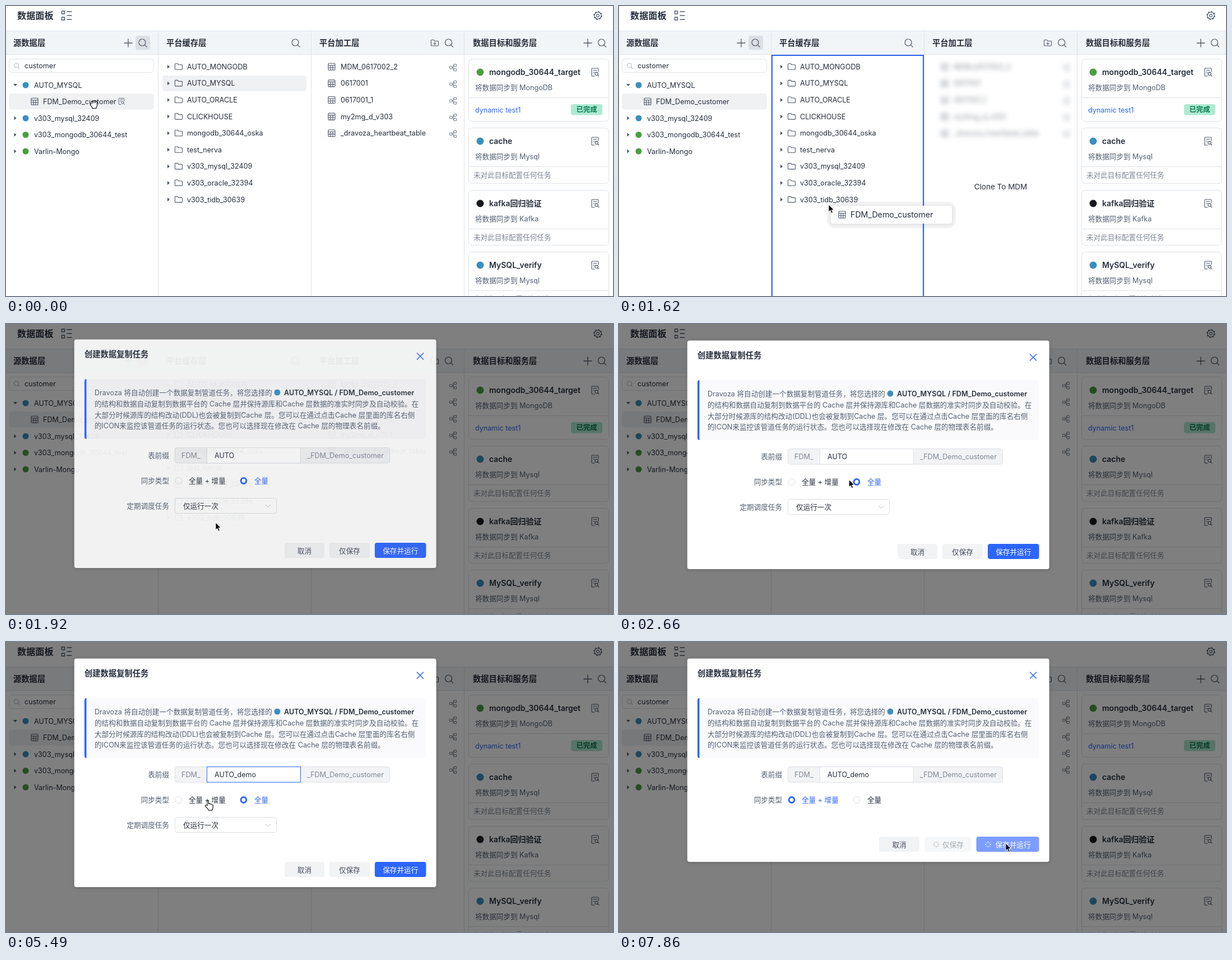
An HTML page that plays this animation: 1083 by 517 pixels, repeating every 8000 ms.

```html
<!DOCTYPE html>
<html lang="zh-CN">
<head>
<meta charset="utf-8">
<title>数据面板</title>
<style>
  html, body { margin: 0; width: 100%; height: 100%; overflow: hidden; background: #fff; }
  svg { display: block; width: 1083px; height: 517px; font: 12.6px Inter, "Noto Sans CJK SC", "Noto Sans CJK", sans-serif; fill: #272e3b; }
  .icon { fill: none; stroke: #4e5969; stroke-width: 1.1; stroke-linecap: round; stroke-linejoin: round; }
  .line { fill: none; stroke: #dfe2e8; }
  .bold { font-weight: 600; }
  .mid { text-anchor: middle; }
  .end { text-anchor: end; }
  .sub { fill: #535f72; }
  .note { fill: #7f8794; }
  .blue { fill: #2c65ff; }
  .faded { filter: blur(4px); opacity: .55; }
  .mysql { fill: #3b8fbe; }
  .mongo { fill: #4a9e40; }
  .kafka { fill: #16181c; }
</style>
</head>
<body>
<svg id="stage" viewBox="0 0 1083 517">
  <defs>
    <g id="plus" class="icon" style="stroke-width:1.3"><path d="M-7 0H7M0-7V7"/></g>
    <g id="lens" class="icon" style="stroke-width:1.2"><circle cx="-1" cy="-1" r="6"/><path d="M3.6 3.6 7 7"/></g>
    <g id="folder" class="icon"><path d="M-6.5 4V-4.5Q-6.5-5.5-5.5-5.5H-1.5L0-3.5H5.5Q6.5-3.5 6.5-2.5V4Q6.5 5 5.5 5H-5.5Q-6.5 5-6.5 4Z"/></g>
    <g id="folderPlus" class="icon"><use href="#folder"/><path d="M-2.4 1H2.4M0-1.4V3.4"/></g>
    <g id="table" class="icon"><rect x="-6" y="-6" width="12" height="12" rx="1"/><path d="M-6-2.5H6M-6 1.7H6M-2 -2.5V6M2-2.5V6"/></g>
    <g id="doc" class="icon"><path d="M6-1V-6Q6-7 5-7H-5Q-6-7-6-6V6Q-6 7-5 7H-1M-3-3.5H3M-3 0H-1"/><circle cx="2.6" cy="2.8" r="2.7"/><path d="M4.6 4.8 7 7"/></g>
    <g id="share" class="icon" style="stroke:#737d8c;stroke-width:1"><rect x="-6" y="-2" width="4" height="4"/><rect x="1.5" y="-6" width="4" height="4"/><rect x="1.5" y="2" width="4" height="4"/><path d="M-2 0H0M1.5-4H0V4H1.5"/></g>
    <g id="list" class="icon" style="stroke-width:1.4"><path d="M-8.5-8H-3.5V-3H-8.5ZM-8.5 3H-3.5V8H-8.5ZM1-7H9M1 0H9M1 7H9"/></g>
    <g id="gear" class="icon"><circle r="6"/><circle r="2.4"/><circle r="7" style="stroke-width:1.6;stroke-linecap:butt" stroke-dasharray="2.75"/></g>
    <path id="closed" d="M-2-3.5V3.5L2 0Z" fill="#4e5969"/>
    <path id="open" d="M-3.5-2H3.5L0 2Z" fill="#4e5969"/>
    <path id="arrow" d="M0 0V13L3 10.4 5.2 15.3 7.4 14.3 5.3 9.5H9.4Z" fill="#000" stroke="#fff" stroke-width=".9"/>
    <path id="beam" d="M-3-7Q0-7 0-5Q0-7 3-7M0-5V6M-3 8Q0 8 0 6Q0 8 3 8M-1.5 1H1.5" fill="none" stroke="#000" stroke-width="1.2" stroke-linecap="round"/>
    <path id="hand" d="M-2 8V1Q-2-.6-.7-.6 .6-.6 .6 1V5.5Q2.5 4.6 3.4 6 5.2 5.3 6 6.8 8.4 6.3 8.4 9V11.5Q8.4 14 7 15.5V17H0V15.5L-5.2 9.8Q-6 8.2-4.6 7.6-3.6 7.2-2 9Z" fill="#fff" stroke="#000" stroke-width="1.1" stroke-linejoin="round"/>
    <path id="grab" d="M-5-2.5Q-4.5-4.8-2.6-4 -2-5.8 0-4.7 1.4-6 2.8-4.3 5.6-5 5.6-2V2.5Q5.6 5 4 6.5V8.5H-3V7L-6.4 2.4Q-7.3.6-5 .4ZM-2.5-3.8V-.6M.1-4.5V-.8M2.8-4.2V-.7" fill="#fff" stroke="#000" stroke-width="1.1" stroke-linejoin="round"/>
  </defs>
</svg>
<script>
const stage = document.getElementById('stage');
const $ = id => document.getElementById(id);

const text = (x, y, s, cls = '', size = 12.6) =>
  `<text x="${x}" y="${y + size * .36}" class="${cls}" font-size="${size}">${s}</text>`;
const icon = (id, x, y) => `<use href="#${id}" x="${x}" y="${y}"/>`;
const box = (x, y, w, h, attrs, r = 4) =>
  `<rect x="${x}" y="${y}" width="${w}" height="${h}" rx="${r}" ${attrs}/>`;
const dot = (x, y, kind, r = 5.5) => `<circle cx="${x}" cy="${y}" r="${r}" class="${kind}"/>`;
const path = (d, attrs) => `<path d="${d}" ${attrs}/>`;
const group = (id, body) => `<g id="${id}">${body}</g>`;
const rowY = i => 108.3 + i * 29.6;

function header() {
  const titles = [[13, '源数据层'], [286, '平台缓存层'], [559, '平台加工层'], [833, '数据目标和服务层']];
  return text(20, 17.3, '数据面板', 'bold', 16.2) + icon('list', 108, 17) + icon('gear', 1056, 17) +
    box(0, 44, 1083, 42, 'fill="#f2f5f8"', 0) +
    path('M0 44.5H1083M0 86.5H1083M271.5 45V517M544.5 45V517M817.5 45V517', 'class="line"') +
    titles.map(([x, s]) => text(x, 66, s, 'bold', 14.3)).join('') +
    box(231, 53, 26, 25, 'fill="#dcdfe3"') +
    icon('plus', 218, 66) + icon('plus', 1038, 66) + icon('folderPlus', 765, 66) +
    [244, 517, 790.5, 1063.5].map(x => icon('lens', x, 66)).join('');
}

function sources() {
  const rows = [['AUTO_MYSQL', 'mysql', 141, 'open'], ['v303_mysql_32409', 'mysql', 200, 'closed'],
    ['v303_mongodb_30644_test', 'mongo', 229.5, 'closed'], ['Varlin-Mongo', 'mongo', 259, 'closed']];
  return box(5.5, 94.5, 258, 24, 'class="line"', 5) +
    '<g class="icon" style="stroke:#b6bcc6"><circle cx="18.5" cy="106" r="4"/><path d="M21.6 109 24 111.5"/></g>' +
    text(33, 106.5, 'customer') +
    box(5, 156, 259, 28.5, 'fill="#f0f1f3"', 5) +
    rows.map(([s, kind, y, caret]) => icon(caret, 16.5, y) + dot(35, y, kind) + text(50, y, s)).join('') +
    icon('table', 51, 170.3) + text(66, 170.3, 'FDM_Demo_customer') +
    group('rowDoc', '<use href="#doc" transform="translate(206 170) scale(.8)"/>');
}

function cache() {
  const names = ['AUTO_MONGODB', 'AUTO_MYSQL', 'AUTO_ORACLE', 'CLICKHOUSE', 'mongodb_30644_oska',
    'test_nerva', 'v303_mysql_32409', 'v303_oracle_32394', 'v303_tidb_30639'];
  return group('rowHover', box(279, 124, 257, 28, 'fill="#f0f1f3"')) +
    names.map((s, i) => icon('closed', 290, rowY(i)) + icon('folder', 308, rowY(i)) + text(323, rowY(i), s)).join('') +
    group('drop', box(273, 88, 270, 440, 'fill="none" stroke="#2c65ee" stroke-width="2"', 0));
}

function models() {
  const names = ['MDM_0617002_2', '0617001', '0617001_1', 'my2mg_d_v303', '_dravoza_heartbeat_table'];
  return group('models', names.map((s, i) =>
      icon('table', 581, rowY(i)) + text(597, rowY(i), s) + icon('share', 798, rowY(i) + 1.5)).join('')) +
    group('clone', text(681, 322.5, 'Clone To MDM', 'mid', 13.5));
}

function targets() {
  const cards = [[94.5, 111, 'mongodb_30644_target', 'mongo', 'MongoDB'], [217.5, 99, 'cache', 'mysql', 'Mysql'],
    [328.5, 98, 'kafka回归验证', 'kafka', 'Kafka'], [438.5, 98, 'MySQL_verify', 'mysql', 'Mysql']];
  return cards.map(([y, h, name, kind, db], i) =>
    box(825.5, y, 250, h, 'class="line"', 6) + path(`M826 ${y + 69}H1075`, 'class="line"') +
    dot(846, y + 23.5, kind, 6.5) + text(862, y + 23.7, name, 'bold', 14) + icon('doc', 1051, y + 23.5) +
    text(837, y + 50.7, '将数据同步到 ' + db, 'sub') +
    (i ? text(834, y + 84, '未对此目标配置任何任务', 'note') : '')).join('') +
    text(837, 185, 'dynamic test1', 'blue') +
    box(1008, 175, 56, 19.5, 'fill="#aeead2"') +
    '<g style="fill:#087a52">' + text(1036, 184.7, '已完成', 'mid bold', 12.4) + '</g>';
}

const ghost = () => group('ghost',
  box(-7, -7, 230, 47, 'fill="#000" opacity=".05"', 14) + box(-3, -2, 222, 38, 'fill="#000" opacity=".04"', 8) +
  box(0, 0, 216, 32, 'fill="#fff"') + icon('table', 20, 16) + text(35, 16, 'FDM_Demo_customer', '', 14.2));

function spinner(x, y, color) {
  const spokes = Array.from({ length: 8 }, (_, i) => {
    const a = i * Math.PI / 4, c = Math.cos(a), s = Math.sin(a);
    return `M${x + 2.8 * c} ${y + 2.8 * s}L${x + 5.6 * c} ${y + 5.6 * s}`;
  }).join('');
  return path(spokes, `stroke="${color}" fill="none"`);
}

const button = (x, w, s, fill, color, load) => box(x, 392, w, 27, `fill="${fill}"`) +
  `<g style="fill:${color}">` + text(x + w / 2 + (load ? 9.5 : 0), 406, s, 'mid') + '</g>' +
  (load ? spinner(x + 21, 405.8, color) : '');

function radio(id, x, label, labelX) {
  return group(id + 'On', `<circle cx="${x}" cy="281.5" r="4.9" fill="#fff" stroke="#2c65ff" stroke-width="3"/>` +
      text(labelX, 281.5, label, 'blue')) +
    group(id + 'Off', `<circle cx="${x}" cy="281.5" r="6" fill="#fff" stroke="#dcdfe6"/>` + text(labelX, 281.5, label));
}

function dialog() {
  const info = ['Dravoza 将自动创建一个数据复制管道任务，将您选择的',
    '的结构和数据自动复制到数据平台的 Cache 层并保持源库和Cache 层数据的准实时同步及自动校验。在',
    '大部分时候源库的结构改动(DDL)也会被复制到Cache 层。您可以在通过点击Cache 层里面的库名右侧',
    '的ICON来监控该管道任务的运行状态。您也可以选择现在修改在 Cache 层的物理表名前缀。'];
  const pale = '#f2f3f5', ink = '#434b59', off = '#a3aab5', blue = '#2c65ff', soft = '#7c9dff';
  return group('dialog',
    '<rect id="panel" x="121.8" y="29.4" width="645.8" rx="4" fill="#fff" style="filter:drop-shadow(0 1px 3px #0003)"/>' +
    text(140, 56, '创建数据复制任务', 'bold', 14.3) +
    path('M733 53.5 745 65.5M745 53.5 733 65.5', 'stroke="#2c65ff" stroke-width="1.5"') +
    box(140, 100, 609, 107, 'fill="#fafafc"') + path('M143.5 100Q140 100 140 104V203Q140 207 143.5 207Z', 'class="blue"') +
    info.map((s, i) => text(158, 124.8 + i * 19.7, s, 'sub')).join('') +
    dot(484, 124, 'mysql') + text(496, 124.2, 'AUTO_MYSQL / FDM_Demo_customer', 'bold') +
    text(291, 236.3, '表前缀', 'end sub') + text(291, 281.5, '同步类型', 'end sub') +
    box(301.5, 222.5, 383, 27.5, 'fill="#f2f3f5" stroke="#dcdfe6"') +
    text(313, 236.3, 'FDM_', 'note') + text(537, 236.3, '_FDM_Demo_customer', 'note') +
    '<rect id="field" x="358.5" y="222.5" width="167" height="27.5" fill="#fff"/>' +
    group('short', text(372, 236.3, 'AUTO')) + group('long', text(372, 236.3, 'AUTO_demo')) +
    path('M0 229V244', 'id="caret" stroke="#222"') +
    radio('full', 308, '全量 + 增量', 326) + radio('once', 424, '全量', 443) +
    group('schedule', text(291, 326, '定期调度任务', 'end sub') +
      box(301.5, 312.5, 181, 27, 'fill="#fff" stroke="#dcdfe6"') + text(316, 326, '仅运行一次') +
      path('M463 324 467.5 328.5 472 324', 'fill="none" stroke="#b6bcc6"')) +
    group('foot',
      group('idle', button(497, 71, '取消', pale, ink) + button(577, 72, '仅保存', pale, ink) + button(658, 91.5, '保存并运行', blue, '#fff')) +
      group('opening', button(476, 72, '取消', pale, ink) + button(557, 72, '仅保存', pale, ink) + button(638, 111.5, '保存并运行', soft, '#fff', true)) +
      group('saving', button(464, 72, '取消', pale, ink) + button(545, 83, '仅保存', '#f6f7f8', off, true) + button(637.5, 112, '保存并运行', soft, '#fff', true))));
}

stage.insertAdjacentHTML('beforeend', header() + sources() + cache() + models() + targets() + ghost() +
  box(0, 0, 1083, 517, 'id="mask" fill="#000"', 0) + dialog() + '<use id="cursor"/>');

// Pointer stops: tick, x, y
const stops = [[0, 157, 174], [3, 160, 172], [10, 374, 354], [15, 374, 354], [20, 430, 236], [28, 430, 236],
  [32, 492, 314], [36, 358, 283], [37, 361, 283], [44, 361, 283], [52, 690, 359], [54, 690, 359]];

function pointer(k) {
  const i = Math.max(1, stops.findIndex(s => s[0] >= k));
  const [k0, x0, y0] = stops[i - 1], [k1, x1, y1] = stops[i];
  const u = (k - k0) / (k1 - k0), e = u * u * (3 - 2 * u);
  return [x0 + (x1 - x0) * e, y0 + (y1 - y0) * e];
}

const show = (id, on) => $(id).style.display = on ? '' : 'none';

// Mask opacity, dialog opacity and dialog lift while the dialog opens
function opening(k) {
  if (k < 12) return [0, 0, 0];
  if (k === 12) return [.11, .09, -16];
  if (k === 13) return [.5, .9, -2];
  return [.5, 1, 0];
}

function draw(k) {
  const drag = k >= 4 && k < 12;
  const [x, y] = pointer(k);
  show('rowDoc', k < 4);
  show('rowHover', k < 4);
  show('ghost', drag);
  show('drop', drag && x > 272);
  show('clone', drag);
  $('models').setAttribute('class', drag ? 'faded' : '');
  $('ghost').setAttribute('transform', `translate(${x + 4} ${y + 2})`);

  const [dim, alpha, lift] = opening(k);
  const brief = k >= 39;
  show('dialog', alpha);
  $('mask').setAttribute('opacity', dim);
  $('dialog').setAttribute('opacity', alpha);
  $('dialog').setAttribute('transform', `translate(0 ${lift})`);
  $('panel').setAttribute('height', brief ? 362.5 : 407.5);
  $('foot').setAttribute('transform', `translate(0 ${brief ? -45 : 0})`);
  show('schedule', !brief);
  show('fullOn', brief);
  show('fullOff', !brief);
  show('onceOn', !brief);
  show('onceOff', brief);
  show('opening', k === 12);
  show('saving', k >= 53);
  show('idle', k > 12 && k < 53);

  $('field').setAttribute('stroke', k >= 21 && !brief ? '#2c65ff' : '#dcdfe6');
  show('short', k < 26);
  show('long', k >= 26);
  show('caret', k >= 21 && k < 29);
  $('caret').setAttribute('transform', `translate(${k < 26 ? 408.5 : 445.5} 0)`);

  const typing = k >= 20 && k < 30;
  const hand = (k >= 37 && k < 46) || k === 52;
  const shape = k < 4 ? 'grab' : typing ? 'beam' : hand ? 'hand' : 'arrow';
  $('cursor').setAttribute('href', '#' + shape);
  $('cursor').setAttribute('transform', `translate(${x} ${y})`);
}

const LOOP = 8000, TICK = 148.3;
let last = -1;
function frame() {
  const k = Math.min(53, Math.floor((performance.now() % LOOP + 14) / TICK));
  if (k !== last) draw(last = k);
  requestAnimationFrame(frame);
}
frame();
</script>
</body>
</html>
```
